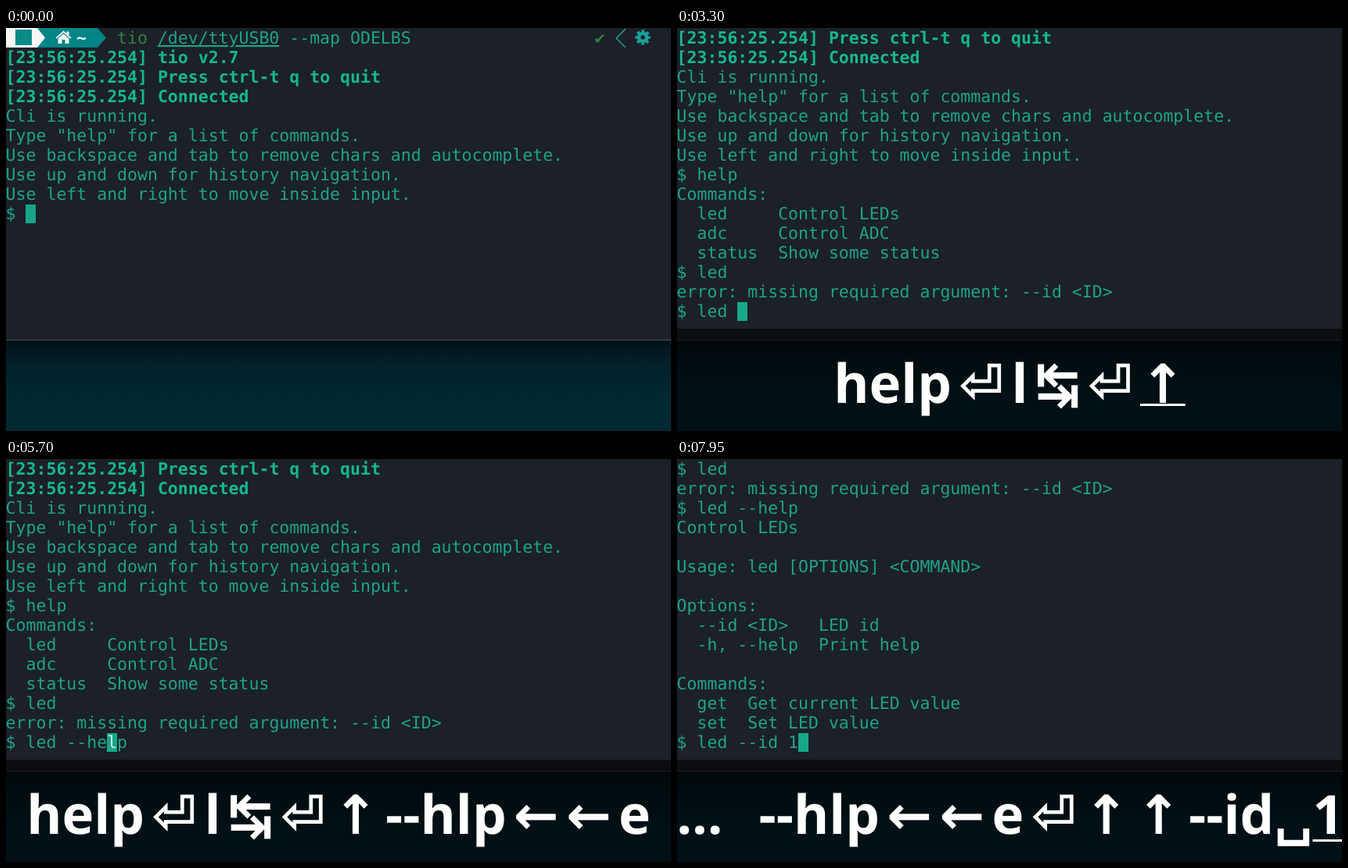
Animation, 850 px wide and 516 px high, one loop 8000 ms. Source, as an HTML page:

```html
<!DOCTYPE html>
<html lang="en">
<head>
<meta charset="utf-8">
<title>Serial terminal session</title>
<style>
  html, body { margin: 0; width: 100%; height: 100%; overflow: hidden; background: #002932; }
  svg { display: block; }
  text { white-space: pre; text-rendering: geometricPrecision; }
  .term { font: 21.53px "DejaVu Sans Mono", "DejaVu Sans", monospace; fill: #1ca487; }
  .bold { font-weight: bold; fill: #14b890; }
  .link { text-decoration: underline; text-decoration-skip-ink: none; }
  .green { fill: #2f7f4b; }
  .key { font: bold 69px "Noto Sans", sans-serif; fill: #fff; }
  .sym { font-family: "DejaVu Sans", sans-serif; }
</style>
</head>
<body>
<svg id="stage" width="850" height="516" viewBox="0 0 850 516">
  <defs>
    <linearGradient id="shade" x1="0" y1="0" x2="0" y2="1">
      <stop offset="0" stop-color="#021217"/>
      <stop offset=".25" stop-color="#01202a"/>
      <stop offset=".65" stop-color="#002932"/>
      <stop offset="1" stop-color="#002932"/>
    </linearGradient>
  </defs>
  <rect y="400" width="850" height="116" fill="url(#shade)"/>
  <rect width="850" height="399" fill="#1c2027"/>
  <rect y="399" width="850" height="1" fill="#485054"/>

  <g id="prompt">
    <path d="M40 0H117L128 12.5L117 25H40Z" fill="#008485"/>
    <path d="M0 0H40L50 12.5L40 25H0Z" fill="#f7f8f6"/>
    <rect x="12" y="2" width="21" height="20" fill="#0b8a8a"/>
    <path d="M63.500 12.500L73.500 3.500L77.500 7V4.500H80.500V9.700L83.500 12.500L82.300 13.700L73.500 6L64.700 13.700Z
             M66.500 13.500L73.500 7.500L80.500 13.500V20H75.500V15H71.500V20H66.500Z" fill="#f2f6f4"/>
    <text class="term bold" x="90" y="20" style="fill:#f2f6f4">~</text>
    <text class="term" x="142" y="20"><tspan class="green">tio</tspan> <tspan class="link">/dev/ttyUSB0</tspan> --map ODELBS</text>
    <text class="term green" x="752.500" y="20">✔</text>
    <path d="M792 1L780 13L792 25" fill="none" stroke="#1c9c98" stroke-width="1.500"/>
    <g fill="none" stroke="#1ba39a" transform="translate(814 12)">
      <circle r="5" stroke-width="4.600"/>
      <circle r="8" stroke-width="3.600" stroke-dasharray="3.500 2.783" stroke-dashoffset="1.750"/>
    </g>
  </g>

  <g id="rows"></g>
  <rect id="cursor" width="13" height="24" fill="#18a689"/>
  <text id="under" class="term" style="fill:#d9eee8"></text>

  <g id="overlay">
    <rect y="385" width="850" height="131" fill="#000" opacity=".6"/>
    <g id="keys"></g>
    <rect id="mark" height="3" fill="#fff"/>
  </g>
</svg>
<script>
const LOOP = 8000, ROWS = 15, CELL = 12.96, LINE = 25;
const EM = 69, GAP = 9.3, BASE = 480, ECHO = 50, RECENT = 250;
const SYMBOLS = '⏎↹↑←';
const $ = id => document.getElementById(id);

// Key presses: time in ms and the key shown
const PRESSES = [
  [950, 'h'], [1150, 'e'], [1350, 'l'], [1500, 'p'], [1700, '⏎'],
  [2150, 'l'], [2350, '↹'], [2750, '⏎'], [3200, '↑'],
  [3650, '-'], [3850, '-'], [4100, 'h'], [4250, 'l'], [4400, 'p'],
  [4750, '←'], [5000, '←'], [5350, 'e'], [5750, '⏎'],
  [6000, '↑'], [6450, '↑'],
  [6900, '-'], [7100, '-'], [7300, 'i'], [7500, 'd'], [7750, '␣'], [7900, '1']
];

const INTRO = [
  '',
  '[23:56:25.254] tio v2.7',
  '[23:56:25.254] Press ctrl-t q to quit',
  '[23:56:25.254] Connected',
  'Cli is running.',
  'Type "help" for a list of commands.',
  'Use backspace and tab to remove chars and autocomplete.',
  'Use up and down for history navigation.',
  'Use left and right to move inside input.'
];

const OUTPUT = {
  'help': [
    'Commands:',
    '  led     Control LEDs',
    '  adc     Control ADC',
    '  status  Show some status'
  ],
  'led': ['error: missing required argument: --id <ID>'],
  'led --help': [
    'Control LEDs',
    '',
    'Usage: led [OPTIONS] <COMMAND>',
    '',
    'Options:',
    '  --id <ID>   LED id',
    '  -h, --help  Print help',
    '',
    'Commands:',
    '  get  Get current LED value',
    '  set  Set LED value'
  ]
};

function svg(tag, attrs, parent) {
  const el = document.createElementNS('http://www.w3.org/2000/svg', tag);
  for (const k in attrs) el.setAttribute(k, attrs[k]);
  return parent.appendChild(el);
}

const rows = Array.from({ length: ROWS }, (_, i) =>
  svg('text', { x: -0.4, y: i * LINE + 20 }, $('rows')));

// Replays the shell's response to a list of keys
function shell(keys) {
  const lines = INTRO.slice(), history = [];
  let input = '', pos = 0, back = 0;
  const set = s => { input = s; pos = s.length; };
  for (const k of keys) {
    if (k === '⏎') {
      lines.push('$ ' + input, ...OUTPUT[input.trim()]);
      history.push(input);
      back = 0;
      set('');
    } else if (k === '↹') set('led ');
    else if (k === '↑') set(history[history.length - ++back]);
    else if (k === '←') pos--;
    else {
      input = input.slice(0, pos) + (k === '␣' ? ' ' : k) + input.slice(pos);
      pos++;
    }
  }
  lines.push('$ ' + input);
  return { lines, input, pos };
}

function drawTerminal(count) {
  const { lines, input, pos } = shell(PRESSES.slice(0, count).map(p => p[1]));
  const top = Math.max(0, lines.length - ROWS);
  $('prompt').style.display = top ? 'none' : '';
  rows.forEach((row, i) => {
    const line = lines[top + i] || '';
    row.textContent = line;
    row.setAttribute('class', line.startsWith('[') ? 'term bold' : 'term');
  });
  const y = (lines.length - 1 - top) * LINE, x = (pos + 2) * CELL - 0.4;
  $('cursor').setAttribute('x', Math.floor(x));
  $('cursor').setAttribute('y', y + 1);
  $('under').setAttribute('x', x);
  $('under').setAttribute('y', y + 20);
  $('under').textContent = input[pos] || '';
}

const isSym = c => SYMBOLS.includes(c);
const isDejaVu = c => isSym(c) || c === '␣';
const pen = document.createElement('canvas').getContext('2d');
const widths = {};
function width(c) {
  if (!(c in widths)) {
    pen.font = `bold 1000px ${isDejaVu(c) ? '"DejaVu Sans"' : '"Noto Sans"'}, sans-serif`;
    widths[c] = pen.measureText(c).width * EM / 1000;
  }
  return widths[c];
}

function drawKeys(count, recent) {
  $('overlay').style.display = count ? '' : 'none';
  $('keys').textContent = '';
  if (!count) return;
  let end = 0;
  const items = PRESSES.slice(0, count).map(([, c], i) => {
    if (i && (isSym(c) || isSym(PRESSES[i - 1][1]))) end += GAP;
    const x = end;
    end += width(c);
    return { c, x };
  });
  const put = (c, x) =>
    svg('text', { x, y: BASE, class: isDejaVu(c) ? 'key sym' : 'key' }, $('keys')).textContent = c;

  // Too long: keep the tail at the right edge behind an ellipsis
  const long = end > 850;
  const shift = long ? 852 - end : (850 - end) / 2;
  if (long) put('…', -0.5);
  for (const { c, x } of items)
    if (!long || x + shift > 57) put(c, x + shift);

  const last = items[count - 1], mark = $('mark');
  mark.style.display = recent ? '' : 'none';
  mark.setAttribute('x', last.x + shift);
  mark.setAttribute('y', isDejaVu(last.c) ? 481 : 487);
  mark.setAttribute('width', width(last.c));
}

const pressed = t => PRESSES.filter(p => p[0] <= t).length;
let shown = '';
function draw(t) {
  const keys = pressed(t), echoed = pressed(t - ECHO);
  const recent = keys > 0 && t < PRESSES[keys - 1][0] + RECENT;
  const state = [keys, echoed, recent].join();
  if (state === shown) return;
  shown = state;
  drawTerminal(echoed);
  drawKeys(keys, recent);
}

const start = performance.now();
function tick() {
  draw((performance.now() - start) % LOOP);
  requestAnimationFrame(tick);
}
tick();
</script>
</body>
</html>
```
